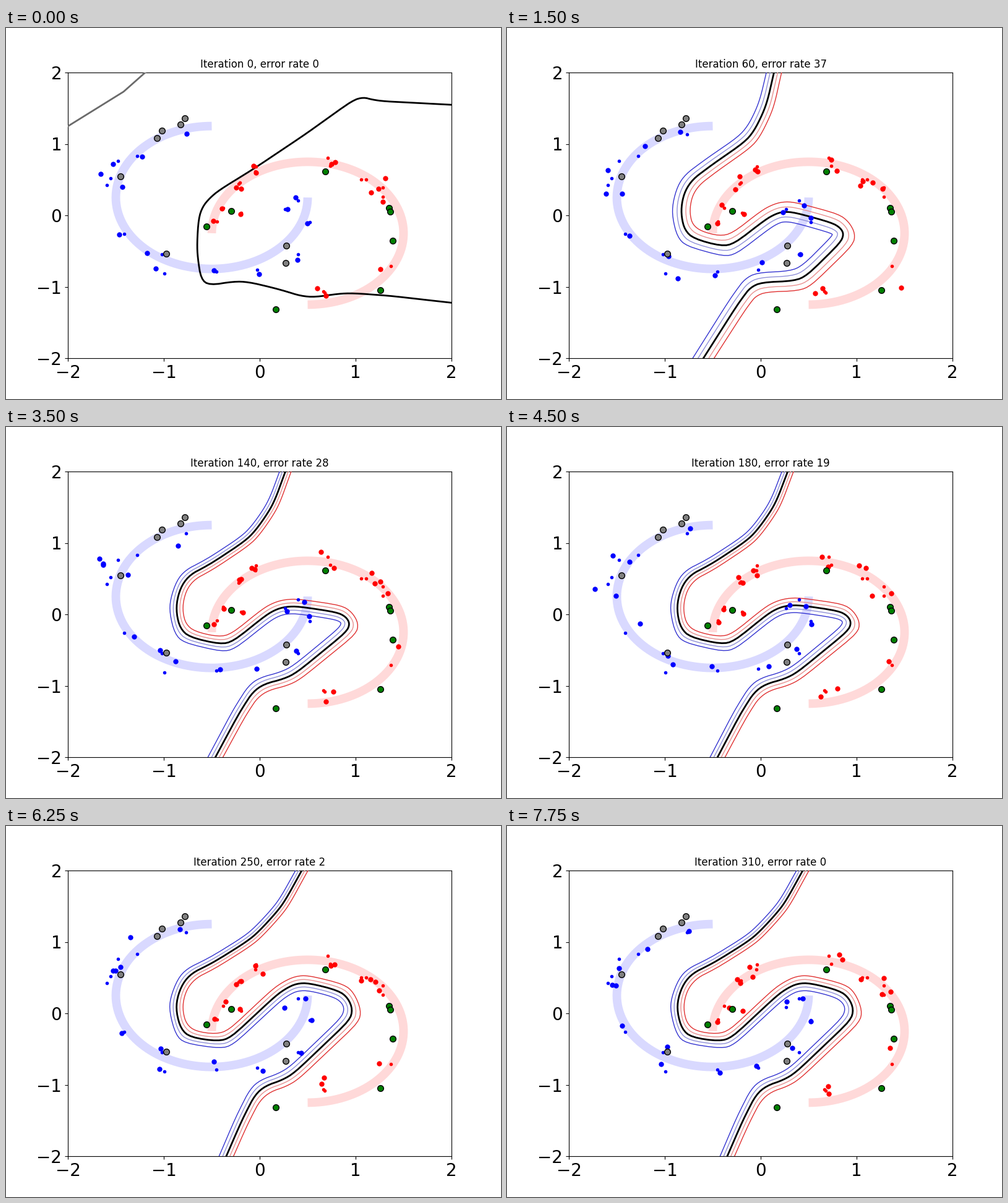
A matplotlib script that plays this animation: 800 px wide and 600 px high, repeating every 8000 ms.

```python
import numpy as np
import matplotlib.pyplot as plt
from matplotlib.animation import FuncAnimation

FRAMES, STEP = 32, 10
LEVELS = [(2, "#3333d0", 1), (1, "#8f8fd8", 1), (-1, "#e89090", 1),
          (-2, "#e03030", 1), (0, "black", 2)]


def pairs(*values):
    return np.reshape(values, (-1, 2)).astype(float)


def to_data(px):
    """Stage pixels to axes units."""
    return (px[:, 0] - 410) / 155, (303 - px[:, 1]) / 115.5


# Fixed points, in stage pixels
BLUE = pairs(291, 172, 212, 207, 181, 215, 169, 243, 163, 254, 191, 333, 252, 366,
             256, 397, 340, 394, 406, 391, 472, 366, 491, 314, 451, 293, 472, 279)
RED = pairs(351, 291, 341, 313, 380, 299, 403, 232, 404, 224, 376, 252, 378, 250,
            520, 210, 524, 223, 574, 245, 582, 245, 609, 258, 609, 273, 622, 385,
            513, 426, 515, 428)
GREEN = pairs(516, 232, 364, 296, 324, 321, 619, 291, 621, 297, 625, 344,
              605, 424, 436, 455)
GREY = pairs(244, 178, 252, 166, 282, 156, 289, 146, 185, 240, 259, 365,
             453, 352, 452, 380)
SIDE_LINE = pairs(95, 162, 190, 103, 225, 72)

# Corners of the decision boundary as training goes on
START = pairs(735, 125, 600, 118, 570, 110, 485, 171, 400, 228, 335, 268,
              312, 296, 308, 360, 317, 418, 380, 408, 440, 422, 488, 437,
              549, 428, 620, 433, 690, 441, 735, 446)
EARLY = pairs(411, 72, 406, 128, 391, 178, 330, 222, 294, 260, 286, 300,
              296, 338, 358, 358, 424, 309, 446, 302, 526, 335, 535, 354,
              492, 413, 393, 405, 372, 426, 296, 534)
MIDDLE = pairs(453, 72, 432, 128, 396, 178, 330, 222, 288, 243, 272, 290,
               284, 337, 358, 354, 430, 296, 462, 288, 547, 300, 560, 323,
               460, 404, 406, 419, 378, 462, 340, 534)
LATE = pairs(478, 72, 446, 130, 400, 180, 335, 221, 290, 243, 272, 290,
             286, 340, 355, 350, 445, 266, 478, 251, 549, 269, 564, 306,
             458, 407, 408, 424, 382, 474, 356, 534)

# Level spacing along the boundary: narrow at the top, wide at the tongue
GAPS = np.interp(np.arange(18), [0, 6, 12, 17], [4.2, 5.2, 6.2, 5.1])


def boundary(it):
    """Fast early change, slow settling, then the tongue rises."""
    if it <= 40:
        line = START + (EARLY - START) * (it / 40) ** 0.35
    else:
        line = EARLY + (MIDDLE - EARLY) * (1 - np.exp((40 - it) / 30))
        t = np.clip((it - 170) / 80, 0, 1)
        line = line + (LATE - line) * t * t * (3 - 2 * t)
    # run on past the edges of the plot
    head = line[0] + 3 * (line[0] - line[1])
    tail = line[-1] + 3 * (line[-1] - line[-2])
    return np.vstack([head, line, tail])


def error_rate(it):
    return round(np.interp(it, [0, 40, 90, 140, 180, 250, 310],
                           [0, 41, 31, 28, 19, 2, 0]))


def jitter(points, rng):
    """Noisy copies; the noise grows with distance from the centre."""
    dist = np.hypot(points[:, 0] - 410, points[:, 1] - 303)
    return points + rng.normal(size=points.shape) * (2 + 0.05 * dist)[:, None]


def offset(line, dist):
    """Parallel line with mitred corners."""
    d = np.diff(line, axis=0)
    d /= np.hypot(d[:, 0], d[:, 1])[:, None]
    n = np.column_stack([-d[:, 1], d[:, 0]])
    a, b = np.vstack([n[:1], n]), np.vstack([n, n[-1:]])
    m = a + b
    scale = np.maximum((m * a).sum(axis=1), 0.4)
    return line + m * (dist / scale)[:, None]


def rounded(line, passes=3):
    """Cut the corners repeatedly."""
    for _ in range(passes):
        d = np.diff(line, axis=0)
        length = np.maximum(np.hypot(d[:, 0], d[:, 1]), 1e-6)
        cut = d * np.minimum(0.25, 12 / length)[:, None]
        line = np.stack([line[:-1] + cut, line[1:] - cut], axis=1).reshape(-1, 2)
    return line


fig = plt.figure(figsize=(8, 6), dpi=100, facecolor="white")
ax = fig.add_axes([0.125, 0.11, 0.775, 0.77])
ax.set(xlim=(-2, 2), ylim=(-2, 2), xticks=range(-2, 3), yticks=range(-2, 3))
ax.tick_params(labelsize=20)
title = ax.set_title("", fontsize=12)

turn = np.linspace(0, 1.5 * np.pi, 200)
for cx, cy, start, sign, colour in [(-0.5, 0.25, np.pi / 2, 1, "blue"),
                                    (0.5, -0.25, np.pi, -1, "red")]:
    angle = start + sign * turn
    ax.plot(cx + np.cos(angle), cy + np.sin(angle), color=colour, alpha=0.15,
            lw=10, solid_capstyle="butt", zorder=1)


def dots(points, colour, size, z, edge="none"):
    return ax.plot(*to_data(points), "o", color=colour, ms=size, mec=edge,
                   mew=1, zorder=z)[0]


dots(BLUE, "blue", 4, 4)
dots(RED, "red", 4, 4)
blue_dots = dots(BLUE, "blue", 6, 5)
red_dots = dots(RED, "red", 6, 5)
dots(GREEN, "green", 7, 6, "black")
dots(GREY, "grey", 7, 6, "black")

side, = ax.plot(*to_data(SIDE_LINE), color="#6a6a6a", lw=2, zorder=3)
curves = [ax.plot([], [], color=c, lw=w, zorder=3)[0] for _, c, w in LEVELS]


def draw(frame):
    it = frame * STEP
    rng = np.random.default_rng(it)
    title.set_text(f"Iteration {it}, error rate {error_rate(it)}")
    blue_dots.set_data(*to_data(jitter(BLUE, rng)))
    red_dots.set_data(*to_data(jitter(RED, rng)))
    side.set_visible(it == 0)
    line = boundary(it)
    gaps = GAPS * (1 + 1.2 * np.exp(-(it / 55) ** 2))
    for curve, (level, _, _) in zip(curves, LEVELS):
        curve.set_data(*to_data(rounded(offset(line, level * gaps))))
        curve.set_visible(level == 0 or it > 0)
    return [title, blue_dots, red_dots, side, *curves]


anim = FuncAnimation(fig, draw, frames=FRAMES, interval=250, repeat=True)
plt.show()
```
